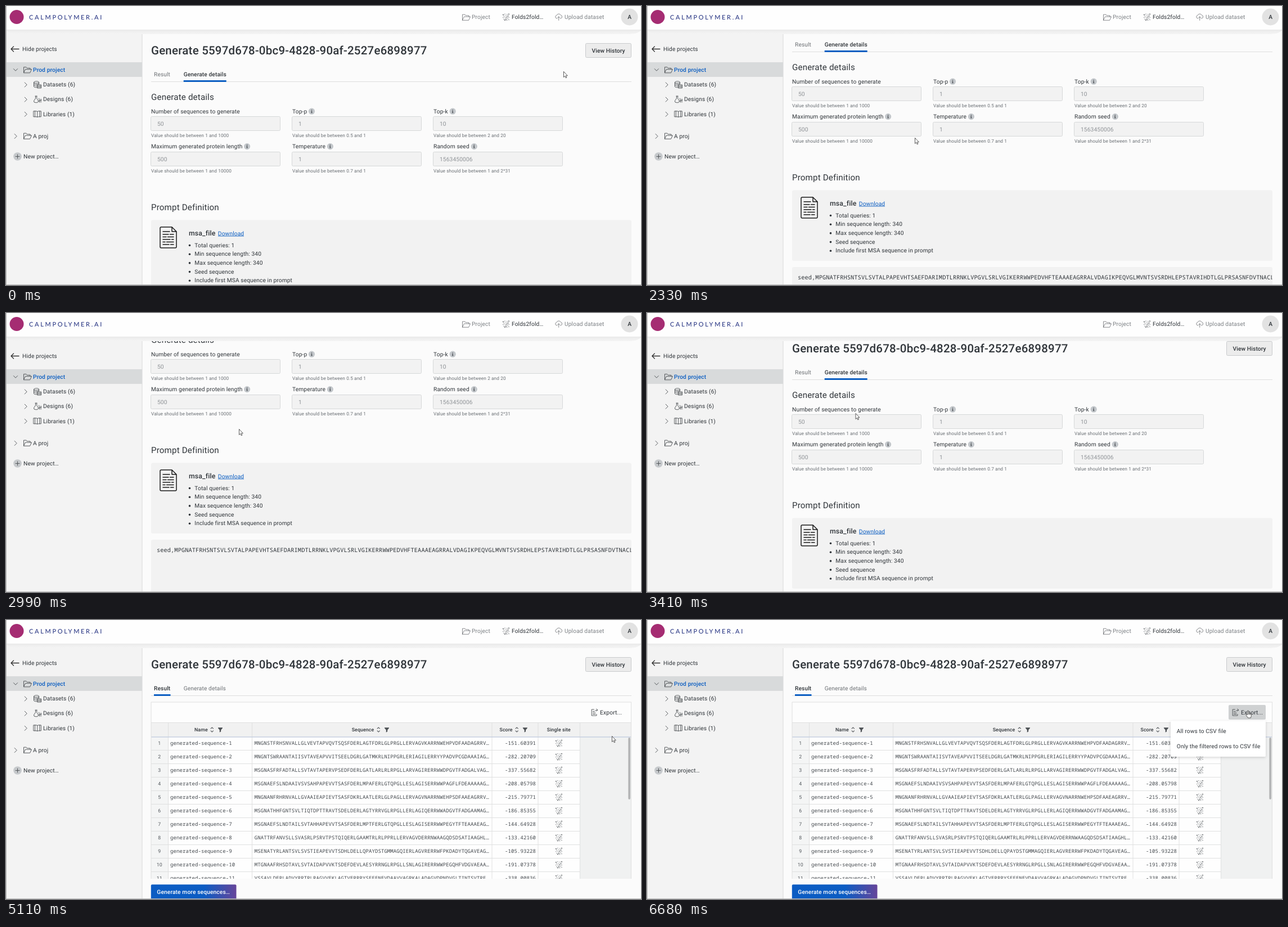
Recreate the animation shown at these times as an HTML page. Size 1129 by 496 pixels, loop 8710 ms.

```html
<!DOCTYPE html>
<html lang="en">
<head>
<meta charset="utf-8">
<title>Generate</title>
<style>
  html, body { margin: 0; width: 100%; height: 100%; overflow: hidden; background: #fbfbfb; }
  svg { display: block; width: 1129px; height: 496px; }
  text { font-family: Roboto, sans-serif; letter-spacing: .01em; text-rendering: geometricPrecision; white-space: pre; }
  .mono { font-family: "Noto Sans Mono", monospace; }
  .brand { font-family: Lato, sans-serif; letter-spacing: 2.7px; }
  .ln { fill: none; stroke: #484c50; stroke-width: .9; stroke-linejoin: round; stroke-linecap: round; }
</style>
</head>
<body>
<svg id="stage" viewBox="0 0 1129 496" xmlns="http://www.w3.org/2000/svg"></svg>
<script>
const LOOP = 8710, INK = '#30353a', SOFT = '#43484d', MUTED = '#6c7074', BLUE = '#0d5fc2';

// ---- drawing helpers (y is the vertical middle of the capitals) ----
const text = (x, y, s, o = {}) => {
  const size = o.size || 10.25;
  return `<text x="${x}" y="${y + size * .356}" font-size="${size}" font-weight="${o.w || 400}" ` +
    `fill="${o.fill || INK}" text-anchor="${o.at || 'start'}" class="${o.cls || ''}">${s}</text>`;
};
const rect = (x, y, w, h, fill, extra = '') =>
  `<rect x="${x}" y="${y}" width="${w}" height="${h}" fill="${fill}" ${extra}/>`;
const path = (d, extra = '') => `<path class="ln" d="${d}" ${extra}/>`;
const solid = (d, fill) => `<path d="${d}" fill="${fill}"/>`;
const at = (x, y, s, extra = '') => `<g transform="translate(${x} ${y})" ${extra}>${s}</g>`;
const use = (id, x, y) => `<use href="#${id}" x="${x}" y="${y}"/>`;
const chevron = (x, y, down) =>
  path(down ? `M${x - 3.5} ${y - 1.8}l3.5 3.6 3.5-3.6` : `M${x - 1.8} ${y - 4}l4 4-4 4`);

const folder = path('M.5 11V1.2H5L6.5 3H12V5M.5 11L3.5 5H14.5L11.8 11Z');
const dots = [[1, 2], [4, 1], [8, 1.5], [11, 1], [2.5, 4.5], [6, 4], [9.5, 4.2], [1, 7], [4.5, 7],
  [7.5, 6.5], [11, 7], [2.5, 10], [6, 9.8], [9, 9.2], [11, 11], [4.2, 11.8], [7.5, 12]]
  .map(([x, y], i) => `<circle cx="${x}" cy="${y}" r="${i % 3 ? .65 : .95}"/>`).join('');

const defs = `<defs>
  <clipPath id="main"><rect x="243" y="43" width="886" height="453"/></clipPath>
  <clipPath id="rows"><rect x="258" y="208" width="854" height="252"/></clipPath>
  <clipPath id="seed"><rect x="258" y="517" width="853.5" height="130"/></clipPath>
  <linearGradient id="cta"><stop offset=".62" stop-color="#0b5cc3"/><stop offset="1" stop-color="#66459a"/></linearGradient>
  <linearGradient id="shade" x2="0" y2="1"><stop offset="0" stop-color="#ebebeb"/><stop offset="1" stop-color="#f4f4f4"/></linearGradient>
  <filter id="drop" x="-20%" y="-30%" width="140%" height="170%"><feDropShadow dx="0" dy="1.5" stdDeviation="2.5" flood-opacity=".16"/></filter>
  <g id="dots" fill="#55595d">${dots}</g>
  <g id="info"><circle r="5.6" fill="#c3c7cb"/><path d="M-.7-3H.7V-1.7H-.7ZM-1.2-.8H.7V2.2H1.3V3H-1.3V2.2H-.7V.1H-1.2Z" fill="#4a4f54"/></g>
  <g id="sort" fill="none" stroke="#55595d" stroke-width="1.1"><path d="M-2.5-1.6L0-4 2.5-1.6M-2.5 1.6L0 4 2.5 1.6"/></g>
  <path id="funnel" d="M-4-4H4V-3L1.2.4V3L-1.2 4.6V.4L-4-3Z" fill="#4c5054"/>
</defs>`;

// ---- page frame ----
function header() {
  return solid('M0 42H1129V43Q1124 50 1106 50H24Q6 50 0 43Z', 'url(#shade)') +
    rect(0, 0, 1129, 42.5, '#fefefe') +
    rect(0, 42, 1129, 1, '#e8e8e8') +
    '<circle cx="19" cy="19.5" r="12.5" fill="#a52c72"/>' +
    text(41, 19.8, 'CALMPOLYMER.AI', { size: 11, fill: '#1d2b7d', cls: 'brand' }) +
    at(811, 14, folder, 'opacity=".7"') + text(828, 19.7, 'Project', { fill: '#7d8185' }) +
    use('dots', 883, 13.5) + text(899, 19.7, 'Folds2fold…') +
    at(976, 13, path('M4 9H3A2.7 2.7 0 0 1 3 3.7 4 4 0 0 1 10.3 3.2 3 3 0 0 1 10.5 9H9.5M6.7 12.5V6M4.7 8L6.7 6 8.7 8'), 'opacity=".7"') +
    text(993, 19.7, 'Upload dataset', { fill: '#7d8185' }) +
    '<circle cx="1108.5" cy="19.5" r="15" fill="#e2e2e2"/>' +
    text(1108.7, 19.7, 'A', { w: 500, at: 'middle' });
}

function sidebar() {
  const base = path('M1 2.5C1 .3 10 .3 10 2.5S1 4.7 1 2.5V10C1 12 6 12 7 11.6M10 2.5V6M1 5C1 7 10 7 10 5M1 7.5C1 9.4 7 9.4 7 9M7.5 7H14V13H7.5ZM7.5 9H14M7.5 11H14');
  const flask = path('M3.5 1H6.5M4 1V5L1 9.5Q.5 12.5 4 12.5H7Q9.5 12 8.8 9L6.2 5V1M10 5L11 8V12M13.5 6V12M9 10L14.5 8');
  const book = path('M.7 1.5H5.5Q7 1.5 7.2 2.8 7.4 1.5 9 1.5H13.8V11.5H9Q7.4 11.5 7.2 12.6 7 11.5 5.5 11.5H.7ZM7.2 2.8V12M3 1.5V11.5M11.3 1.5V11.5');
  return rect(0, 43, 242, 453, '#f3f3f3') + rect(241.5, 43, 1, 453, '#d9d9d9') +
    path('M23 76.5H9M13.5 72L9 76.5 13.5 81', 'style="stroke:#333;stroke-width:1.3"') + text(29, 76.5, 'Hide projects') +
    rect(1, 100, 241, 26, '#d8dadb') +
    chevron(17, 113.5, true) + at(31, 107.5, folder) +
    text(48, 113.2, 'Prod project', { w: 500, fill: BLUE }) +
    [['Datasets (6)', base], ['Designs (6)', flask], ['Libraries (1)', book]].map(([s, icon], i) => {
      const y = 139.5 + 26.2 * i;
      return chevron(35, y + .5) + at(48.5, y - 6.5, icon) + text(66, y, s);
    }).join('') +
    chevron(17, 231.5) + at(31, 225, folder) + text(48, 231, 'A proj') +
    '<circle cx="20.5" cy="267.5" r="7.3" fill="#c6c9cc"/>' + path('M17 267.5H24M20.5 264V271') +
    text(31, 267.5, 'New project…');
}

// ---- scrolling page ----
function pageTop() {
  return text(258, 79, 'Generate 5597d678-0bc9-4828-90af-2527e6898977', { size: 20.5, w: 500 }) +
    rect(1030.5, 66.5, 81, 25, '#ececec', 'rx="2" stroke="#c9cbcd"') +
    text(1071, 79, 'View History', { w: 500, at: 'middle' }) +
    rect(258, 134, 854, 1, '#dedede') +
    '<rect id="tabHover" x="258" y="111" width="39" height="20" rx="2" fill="#d4d5d6"/>';
}

function tabs(active) {
  const tab = (x, w, s, on) => text(x, 121, s, { size: 10.2, w: on ? 500 : 400, fill: on ? INK : MUTED }) +
    (on ? rect(x, 132, w, 3, BLUE) : '');
  return tab(263, 29.5, 'Result', active === 0) + tab(315.7, 76, 'Generate details', active === 1);
}

function field(x, y, label, value, hint, infoX) {
  return text(x, y, label) + (infoX ? use('info', infoX, y) : '') +
    rect(x - .5, Math.floor(y + 9.5) + .5, 230, 25, '#f2f2f2', 'rx="2" stroke="#d6d8d9"') +
    text(x + 11, y + 22.3, value, { fill: '#8f9397' }) +
    text(x, y + 43.2, 'Value should be between ' + hint, { size: 8.31, fill: '#6a6f74' });
}

function details() {
  const bullets = ['Total queries: 1', 'Min sequence length: 340', 'Max sequence length: 340',
    'Seed sequence', 'Include first MSA sequence in prompt'];
  const seed = 'seed,MPGNATFRHSNTSVLSVTALPAPEVHTSAEFDARIMDTLRRNKLVPGVLSRLVGIKERRWWPEDVHFTEAAAEAGRRALVDAGIKPEQVGLMVNTSVSRDHLEPSTAVRIHDTLGLPRSASNFDVTNACL';
  return tabs(1) +
    text(258, 162, 'Generate details', { size: 15.15 }) +
    field(258, 187.2, 'Number of sequences to generate', '50', '1 and 1000') +
    field(509, 187.2, 'Top-p', '1', '0.5 and 1', 543.5) +
    field(760, 187.2, 'Top-k', '10', '2 and 20', 794.2) +
    field(258, 249.6, 'Maximum generated protein length', '500', '1 and 10000', 428.6) +
    field(509, 249.6, 'Temperature', '1', '0.7 and 1', 576.4) +
    field(760, 249.6, 'Random seed', '1563450006', '1 and 2^31', 832.3) +
    text(258, 358, 'Prompt Definition', { size: 15.15 }) +
    rect(258, 380.5, 854, 125.5, '#f2f2f2', 'rx="3"') +
    at(273, 392, path('M3 1H22L30 9V36Q30 38 28 38H3Q1 38 1 36V3Q1 1 3 1ZM22 1V9H30M6 9H18M6 14H16M18.5 14H25M6 18.5H12M14.5 18.5H25M6 23H19M21.5 23H25M6 27.5H10M12.5 27.5H25M6 32H17M19.5 32H25',
      'style="stroke:#1a1a1a;stroke-width:1.5"')) +
    text(325, 404, 'msa_file', { size: 12.3, w: 500 }) +
    text(376.8, 404, 'Download', { fill: BLUE }) + rect(377, 408.6, 46, .9, BLUE) +
    bullets.map((s, i) => {
      const y = 425 + 15.7 * i;
      return `<circle cx="326.5" cy="${y + .5}" r="1.8" fill="${INK}"/>` + text(335.3, y, s, { size: 10.2 });
    }).join('') +
    rect(258, 517, 854, 130, '#f2f2f2', 'rx="3"') +
    `<g clip-path="url(#seed)">${text(268, 535.3, seed, { size: 10.29, cls: 'mono' })}</g>`;
}

const ROWS = `MNGNSTFRHSNVALLGLVEVTAPVQVTSQSFDERLAGTFDRLGLPRGLLERVAGVKARRNWEHPVDFAADAGRRV -151.60391
MNGNTSWRAANTAIISVTAVEAPVVITSEELDGRLGATMKRLNIPPGRLERIAGILERRYYPADVPCGDAAAIAG -282.20709
MSGNASFRFADTALLSVTAVTAPERVPSEDFDERLGATLARLRLRPGLLARVAGIRERRWWDPGVTFADGALVAG -337.55682
MSGNAEFSLNDAAIVSVSAHPAPEVVTSASFDERLMPAFERLGTQPGLLESLAGISERRWWPAGFLFDEAAAAAG -208.05798
MNGNANFRHRNVALLGVAAIEAPIEVTSASFDKRLAATLERLGLPAGLLERVAGVNARRNWEHPSDFAAEAGRRV -215.79771
MSGNATHHFGNTSVLTIQTDPTTRAVTSDELDERLAGTYRRVGLRPGLLERLAGIQERRWWADGVTFADGAAMAG -186.85355
MSGNAEFSLNDTAILSVTAHHAPEVVTSASFDERLMPTFERLGTQPGLLESLAGISERRWWPEGYTFTEAAAEAG -144.64928
GNATTRFANVSLLSVASRLPSRVTPSTQIQERLGAAMTRLRLPPRLLERVAGVDERRNWAAGQDSDSATIAAGHL -133.42160
MSENATYRLANTSVLSVSTIEAPEVVTSDHLDELLQPAYDSTGMMAGQIERLAGVRERRWFPKDADYTQGAVEAG -105.93228
MTGNAAFRHSDTAVLSVTAIDAPVVKTSDEFDEVLAESYRRNGLRPGLLSNLAGIRERRWWPEGQHFVDGVAEAA -191.07378
VSSAVLDERLADVYRRTRLRAGVVEKLAGTVERRRYSEEENEVDAAVVAGRKALADAGVDPNDVGLTINTSVTRE -338.00836`
  .split('\n').map(r => r.split(' '));

function results() {
  const line = '#dfe0e0', head = (x, s) => text(x, 195.3, s, { size: 8.8, w: 500 });
  const tools = x => use('sort', x, 195) + use('funnel', x + 14.7, 195.2);
  const edges = [288, 437, 863.5, 945.5, 1020];
  const mono = { size: 9, cls: 'mono', fill: SOFT };
  const rows = ROWS.map(([seq, score], i) => {
    const y = 219 + 24 * i;
    return text(272.7, y, i + 1, { size: 8.8, at: 'middle', fill: '#555a5f' }) +
      text(292, y, 'generated-sequence-' + (i + 1), mono) + text(441.8, y, seq + '…', mono) +
      text(942, y, score, { ...mono, at: 'end' }) + use('dots', 977, y - 6.3) +
      rect(258, y + 12, 762, 1, line);
  }).join('');
  return tabs(0) +
    rect(258, 146, 854, 37, '#fdfdfd') +
    '<rect id="exportBg" x="1034" y="151" width="66" height="26" rx="2"/>' +
    at(1040, 158, path('M5.5 1H1.2V12H10V9.5M3.3 4.5H6M3.3 7H8M3.3 9.5H8M7 4Q7.5 2 11.5 2M9.8 0L12 2 9.8 4.2')) +
    text(1056, 164, 'Export...', { size: 10.4 }) +
    rect(258, 183, 854, 25, '#f1f1f1') + rect(258, 182, 854, 1, line) +
    rect(258, 208, 30, 252, '#f4f5f5') + rect(288, 208, 732, 252, '#fefefe') + rect(1020.5, 208, 91, 252, '#f0f1f1') +
    head(335, 'Name') + tools(366.3) + head(614.7, 'Sequence') + tools(662.3) +
    head(877.5, 'Score') + tools(908.2) + head(961.8, 'Single site') +
    `<g clip-path="url(#rows)">${rows}</g>` +
    edges.map(x => rect(x, 183, 1, 277, line)).join('') +
    rect(258, 207.3, 854, 1.4, '#c3cde0') +
    rect(257.5, 146, 1, 314, line) + rect(1111, 146, 1, 314, line) + rect(258, 145.5, 854, 1, line) +
    rect(1106.3, 209, 3.8, 110, '#b4b5b6', 'rx="1.9"') +
    rect(257.8, 470.3, 151.7, 28, 'url(#cta)', 'rx="2"') +
    text(268.3, 483.5, 'Generate more sequences…', { w: 500, fill: '#fff' });
}

const menu = `<g filter="url(#drop)">${rect(931, 179.5, 169, 63.5, '#fff', 'rx="2"')}</g>` +
  text(941.8, 197.5, 'All rows to CSV file', { size: 10.2 }) +
  text(941.8, 224.3, 'Only the filtered rows to CSV file', { size: 10.2 });

const arrow = '<path d="M.5.5V10.6L2.8 8.5 4.3 11.9 5.9 11.2 4.4 7.9H7.4Z" fill="#fff" stroke="#333" stroke-width=".8"/>';
const hand = '<path d="M3 8.3V1.5Q3 .5 4 .5T5 1.5V5.4Q6.2 4.6 6.7 5.6 7.9 5 8.3 6.1 9.7 5.7 9.8 7V10.3L8.8 13.5H4L1 9.3Q0 7.6 1.3 7.3 2.2 7.2 3 8.3ZM5 5.4V8M6.7 5.6V8M8.3 6.1V8" fill="#fff" stroke="#333" stroke-width=".8"/>';

document.getElementById('stage').innerHTML = defs +
  rect(0, 0, 1129, 496, '#fbfbfb') +
  `<g clip-path="url(#main)"><g id="page">${pageTop()}<g id="details">${details()}</g><g id="results">${results()}</g></g></g>` +
  sidebar() + header() +
  rect(0, 0, 1, 496, '#b9b9b9') + rect(0, 495, 1129, 1, '#bdbdbd') +
  `<g id="menu">${menu}</g><g id="arrow">${arrow}</g><g id="hand">${hand}</g>`;

// ---- timeline: every entry holds until the next ----
const POINTER = [
  [0, 991, 116], [680, 991, 115], [1330, 937, 139.5], [1490, 790, 176], [1610, 626, 217], [1880, 569, 218],
  [2030, 482, 232], [2180, 476, 234], [2600, 466, 231.5], [2870, 440, 218], [2990, 414, 206],
  [3140, 390, 190], [3260, 370.5, 178], [3530, 345, 155], [3650, 310, 129], [3800, 271, 130],
  [3950, 266, 121, 1], [4100, 269.5, 125, 1], [4520, 380, 180], [4650, 612, 252], [4800, 1003, 231],
  [4950, 1070, 207], [5110, 1077, 206], [5380, 1074, 192], [5500, 1071, 179], [5650, 1066, 164, 1],
  [5770, 1064.5, 160.5, 1]];
const SCROLL = [[0, 0], [2330, 53], [2450, 57], [2600, 105], [2720, 114], [3410, 16], [3530, 3], [3650, 0]];
const MENU = [[0, 0, 0], [6290, .55, .3], [6410, .9, .75], [6530, 1.02, .95], [6680, 1, 1]];

const held = (keys, t) => keys.filter(k => k[0] <= t).pop();
const $ = id => document.getElementById(id);
const set = (id, attrs) => { for (const k in attrs) $(id).setAttribute(k, attrs[k]); };
const show = (id, on) => set(id, { display: on ? 'inline' : 'none' });

function draw(t) {
  const [, x, y, isHand] = held(POINTER, t);
  const [, scale, alpha] = held(MENU, t);
  const done = t >= 4370;
  set('page', { transform: `translate(0 ${-held(SCROLL, t)[1]})` });
  show('details', !done);
  show('results', done);
  show('tabHover', t >= 3950 && !done);
  set('exportBg', { fill: t >= 6290 ? '#cfd1d2' : t >= 5650 ? '#eceded' : 'none' });
  show('menu', alpha > 0);
  set('menu', { opacity: alpha, transform: `translate(1067 178) scale(${scale}) translate(-1067 -178)` });
  show('arrow', !isHand);
  show('hand', isHand);
  set(isHand ? 'hand' : 'arrow', { transform: `translate(${x} ${y})` });
}

const start = performance.now();
function tick() {
  draw((performance.now() - start) % LOOP);
  requestAnimationFrame(tick);
}
tick();
</script>
</body>
</html>
```
